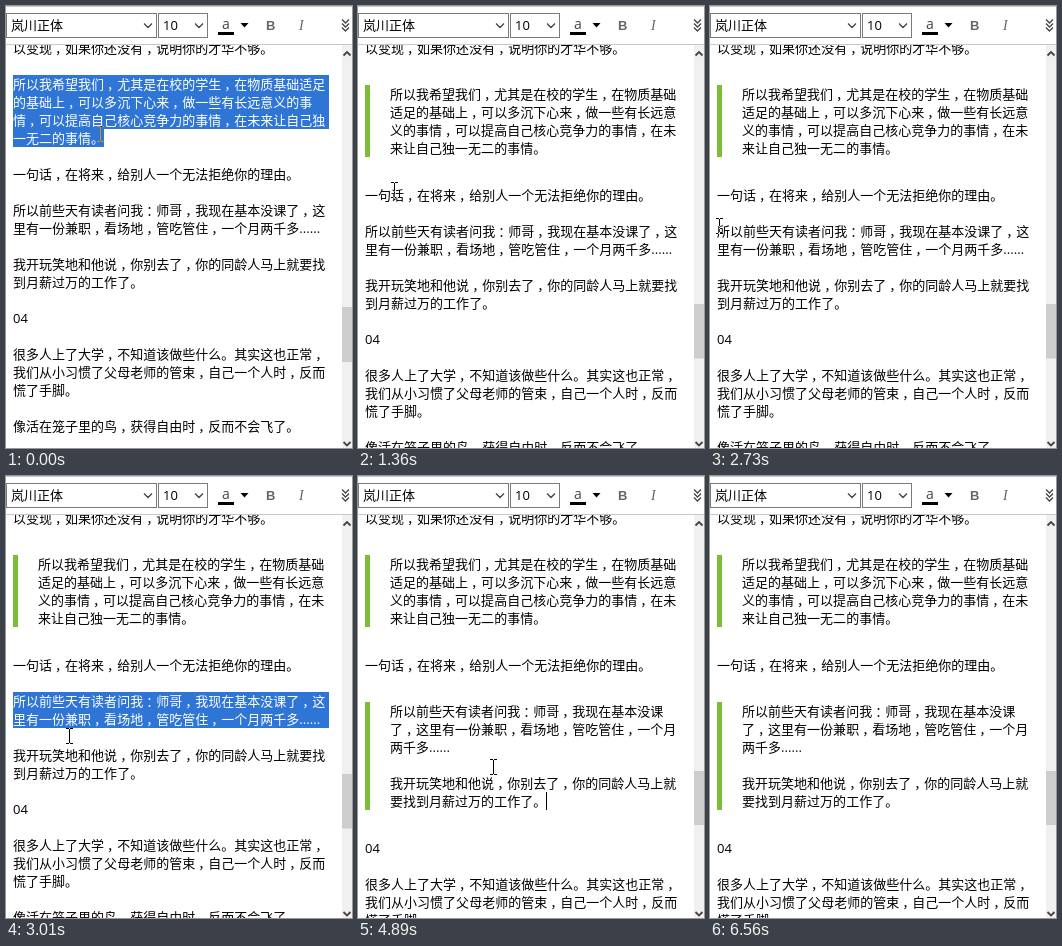
Recreate the animation shown at these times as an HTML page. Size 346 by 442 pixels, loop 6.66 s.

```html
<!DOCTYPE html>
<html lang="zh-CN">
<head>
<meta charset="utf-8">
<title>Quote formatting</title>
<style>
  html, body { margin: 0; width: 100%; height: 100%; overflow: hidden; background: #fff; }
  svg { display: block; isolation: isolate; }
  text {
    font: 13px "Open Sans", "Noto Sans CJK SC", "Noto Sans CJK", sans-serif;
    font-kerning: none; text-spacing-trim: space-all; white-space: pre;
  }
  #cursor { mix-blend-mode: difference; }
  .line { fill: none; stroke: #444; stroke-width: 1.3; }
  .bold { stroke-width: 1.8; }
</style>
</head>
<body>
<svg width="346" height="442" viewBox="0 0 346 442">
  <rect width="346" height="442" fill="#fff"/>
  <g id="page"></g>
  <rect id="caret" width="1" height="18"/>

  <rect x="336" y="39" width="10" height="403" fill="#f0f0f0"/>
  <rect id="thumb" x="336" width="10" fill="#cdcdcd"/>
  <path class="line bold" d="M337.5 49.500l3.500-3.500 3.500 3.500M337.500 436l3.500 3.500 3.500-3.500"/>

  <rect width="346" height="38" fill="#fff"/>
  <path stroke="#c8c8c8" d="M0 .5h346M0 38.500h346"/>
  <g fill="#fff" stroke="#7a7a7a">
    <rect x=".5" y="7.5" width="150" height="24"/>
    <rect x="152.5" y="7.5" width="49" height="24"/>
  </g>
  <text x="5" y="24">岚川正体</text>
  <text x="157" y="24">10</text>
  <path class="line" d="M138 17.500l4 4 4-4M189 17.500l4 4 4-4"/>
  <text x="216" y="23" fill="#444" style="font-size:14px">a</text>
  <rect x="212" y="26" width="16" height="3"/>
  <path d="M234.500 17h8l-4 4.500z"/>
  <text x="260" y="24" fill="#666" style="font:bold 13px 'Liberation Sans',sans-serif">B</text>
  <text x="293" y="24" fill="#666" style="font:italic 14px 'Liberation Serif',serif">I</text>
  <path class="line" d="M336 13.500l3.500 3.500 3.500-3.500M336 17.500l3.500 3.500 3.500-3.500M336 21.500l3.500 3.500 3.500-3.500"/>

  <path id="cursor" fill="none" stroke="#fff" d="M-3-7.500h3M1-7.500h3M.5-7v14M-3 7.500h3M1 7.500h3"/>
</svg>
<script>
const LOOP = 6660, TICK = 135.5, BLINK = 543;
const QUOTE_1 = 560, QUOTE_2 = 4890;
const CHAR = 13, ROW = 18, LEFT = 7, INDENT = 25, RIGHT = 323;
const CLICK = 21, DRAG = 22, EXIT = 45;   // in ticks
const $ = id => document.getElementById(id);

// Paragraph groups; a group is turned into a quote as a whole.
const groups = [
  ['以变现，如果你还没有，说明你的才华不够。'],
  ['所以我希望我们，尤其是在校的学生，在物质基础适足的基础上，可以多沉下心来，做一些有长远意义的事情，可以提高自己核心竞争力的事情，在未来让自己独一无二的事情。'],
  ['一句话，在将来，给别人一个无法拒绝你的理由。'],
  ['所以前些天有读者问我：师哥，我现在基本没课了，这里有一份兼职，看场地，管吃管住，一个月两千多……',
   '我开玩笑地和他说，你别去了，你的同龄人马上就要找到月薪过万的工作了。'],
  ['04'],
  ['很多人上了大学，不知道该做些什么。其实这也正常，我们从小习惯了父母老师的管束，自己一个人时，反而慌了手脚。'],
  ['像活在笼子里的鸟，获得自由时，反而不会飞了。']
];

// Turning points of the pointer: tick, x, y
const path = [
  [5, 94, 128], [7, 86, 158], [9, 36, 184], [10, 79, 225], [12, 113, 265],
  [14, 63, 225], [15, 60, 221], [17, 27, 231], [20, 9, 220], [21, 10, 220],
  [22, 63, 260], [24, 115, 283], [26, 135, 291], [37, 135, 291], [40, 173, 336], [43, 270, 433]
];

function pointerAt(tick) {
  const next = path.findIndex(p => p[0] > tick);
  if (next === 0) return path[0].slice(1);
  const i = next < 0 ? path.length - 1 : next;
  const [t0, x0, y0] = path[i - 1], [t1, x1, y1] = path[i];
  const k = Math.min(1.11, (tick - t0) / (t1 - t0));
  return [x0 + (x1 - x0) * k, y0 + (y1 - y0) * k].map(Math.round);
}

// Breaks lines so that none begins with punctuation.
function wrap(text, cols) {
  const rows = [];
  while (text.length > cols) {
    const n = /[，。：]/.test(text[cols]) ? cols - 1 : cols;
    rows.push(text.slice(0, n));
    text = text.slice(n);
  }
  return [...rows, text];
}

const rect = (x, y, w, h, fill) =>
  `<rect x="${x}" y="${y}" width="${w}" height="${h}" fill="${fill}"/>`;

// Commas and colons sit near the middle of their cell.
const nudge = c => /[，：]/.test(c) ? 3 : 0;

function write(x, top, str, fill = '#000') {
  const chars = [...str.replace('……', '......')];
  const dx = chars.map((c, i) => nudge(c) - (i ? nudge(chars[i - 1]) : 0));
  return `<text x="${x}" y="${top + 14}" dx="${dx.join(' ')}" fill="${fill}">${chars.join('')}</text>`;
}

// Each row as { x, y, text, group }, plus the bars beside the quotes.
function layout(stage) {
  const rows = [], bars = [];
  let y = 33;
  groups.forEach((paras, group) => {
    const quoted = group === 1 && stage > 0 || group === 3 && stage > 1;
    const x = quoted ? LEFT + INDENT : LEFT;
    if (quoted) y += 10;
    const top = y;
    paras.forEach((para, i) => {
      const lines = wrap(para, quoted ? 22 : 24);
      if (i) lines.unshift('');
      for (const text of lines) {
        rows.push({ x, y, text, group });
        y += ROW;
      }
    });
    if (quoted) bars.push({ top, height: y - top, last: rows.at(-1) });
    y += quoted ? 29 : ROW;
  });
  return { rows, bars };
}
const layouts = [0, 1, 2].map(layout);

// Number of selected characters in a row when the drag ends at (px, py).
function selected(row, px, py) {
  if (py >= row.y + ROW) return Infinity;
  return py < row.y ? 0 : Math.min(row.text.length, Math.round((px - row.x) / CHAR));
}

function drawPage({ rows, bars }, group, px, py) {
  let out = bars.map(b => rect(LEFT, b.top, 5, b.height, '#7cbd35')).join('');
  for (const row of rows) {
    const { x, y, text } = row;
    const n = row.group === group ? selected(row, px, py) : 0;
    if (n) out += rect(x, y, Math.min(n * CHAR, RIGHT - x), ROW, '#2f75d6');
    if (n) out += write(x, y, text.slice(0, n), '#fff');
    if (n < text.length) out += write(x + n * CHAR, y, text.slice(n));
  }
  return out;
}

function place(id, attrs) {
  for (const name in attrs) $(id).setAttribute(name, attrs[name]);
}

let shown;
function render(t) {
  const tick = Math.floor((t - 7) / TICK);
  const stage = (t >= QUOTE_1) + (t >= QUOTE_2);
  const [px, py] = pointerAt(tick);
  const dragging = stage === 1 && tick >= DRAG;
  const group = stage === 0 ? 1 : dragging ? 3 : -1;
  const page = layouts[stage];

  const key = [stage, group, px, py].join();
  if (key !== shown) $('page').innerHTML = drawPage(page, group, px, py);
  shown = key;

  place('thumb', { y: 301 - 3 * stage, height: 55 - stage / 2 });
  place('cursor', {
    transform: `translate(${px} ${py})`,
    visibility: tick < EXIT ? 'visible' : 'hidden'
  });

  // The caret waits after the newest quote until the pointer clicks elsewhere.
  const since = t - (stage === 2 ? QUOTE_2 : QUOTE_1);
  const clicked = stage === 1 && tick >= CLICK;
  const blinkOn = clicked || Math.floor(since / BLINK) % 2 === 0;
  const visible = stage > 0 && !dragging && blinkOn;
  place('caret', { visibility: visible ? 'visible' : 'hidden' });
  if (visible) {
    const row = clicked ? page.rows.find(r => r.group === 3) : page.bars.at(-1).last;
    place('caret', { x: row.x + (clicked ? 0 : row.text.length * CHAR), y: row.y });
  }
}

const start = performance.now();
function loop() {
  render((performance.now() - start) % LOOP);
  requestAnimationFrame(loop);
}
loop();
</script>
</body>
</html>
```
